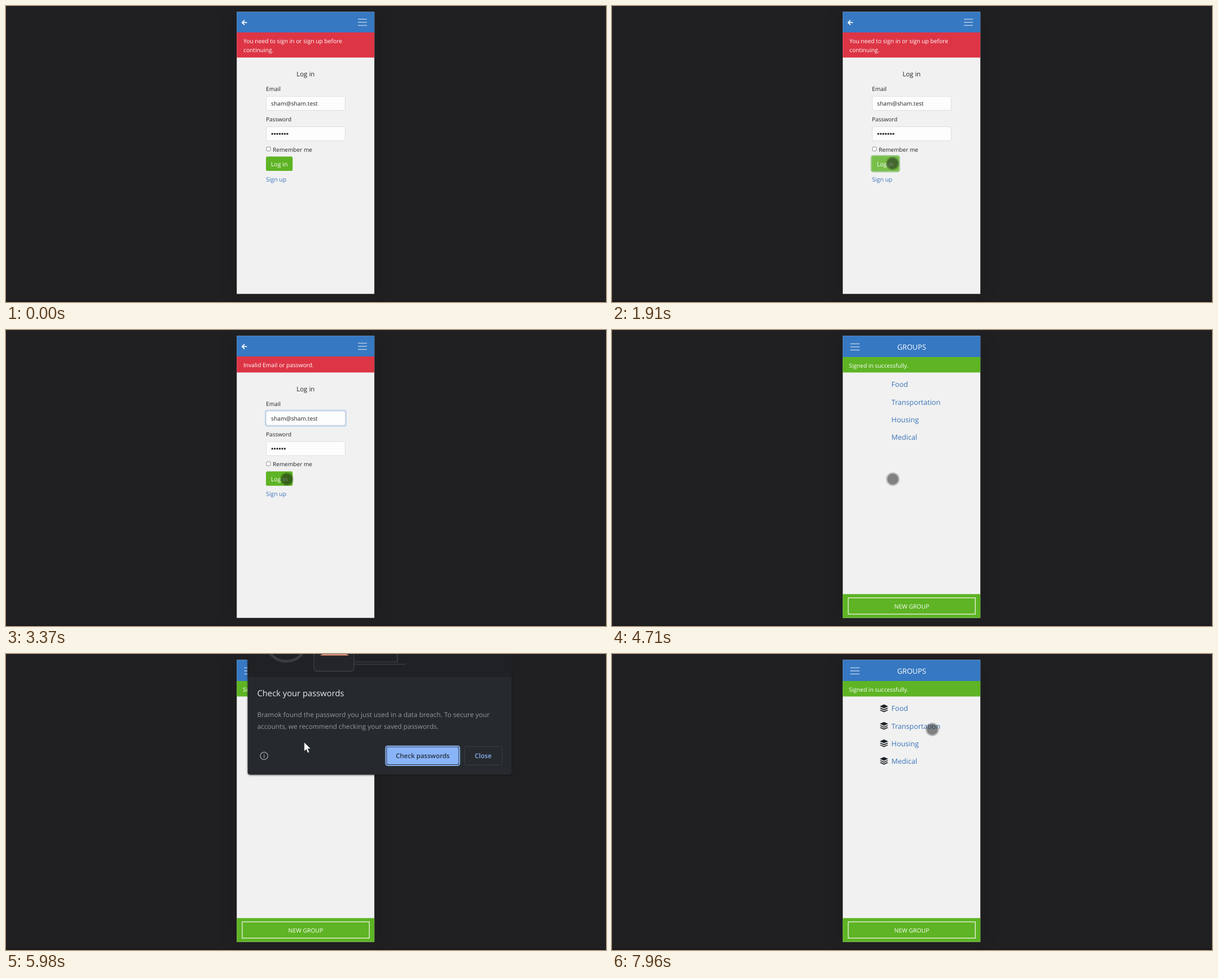
Recreate the animation shown at these times as an HTML page. Size 1064 by 526 pixels, loop 8000 ms.

```html
<!DOCTYPE html>
<html lang="en">
<head>
<meta charset="utf-8">
<title>Log in</title>
<style>
  html, body { margin: 0; width: 100%; height: 100%; overflow: hidden; background: #202022; }
  svg { display: block; width: 1064px; height: 526px; }
  text { font-family: "Open Sans", "Noto Sans", sans-serif; font-size: 10.25px; fill: #212529; white-space: pre; text-rendering: geometricPrecision; }
  .white { fill: #fff; }
  .link { fill: #3873b9; }
  .mid { text-anchor: middle; }
  .item { font-size: 12.6px; }
  .field { fill: #fdfdfd; stroke: #dcdee0; }
  .bars { stroke: #fff; stroke-opacity: .62; stroke-width: 1.3; }
  .para { font-size: 11.85px; fill: #94989d; }
  .bold { font-size: 11.5px; font-weight: 600; }
  .art { fill: none; stroke: #3a3b3e; }
</style>
</head>
<body>
<svg viewBox="0 0 1064 526">
  <defs>
    <filter id="soft" x="-20%" y="-20%" width="140%" height="140%"><feGaussianBlur stdDeviation="11"/></filter>
    <filter id="drop" x="-5%" y="-10%" width="110%" height="125%">
      <feDropShadow dx="0" dy="1" stdDeviation="1.6" flood-color="#000" flood-opacity=".5"/>
    </filter>
    <clipPath id="phone"><rect x="409.2" y="10.4" width="244" height="501.2"/></clipPath>
  </defs>

  <rect width="1064" height="526" fill="#202022"/>
  <rect y="524" width="1064" height="2" fill="#1a1a1c"/>
  <rect x="394" y="12" width="274" height="500" fill="#000" opacity=".06" filter="url(#soft)"/>
  <rect x="409.2" y="10.4" width="244" height="501.2" fill="#f1f1f1"/>

  <g id="login">
    <rect x="409.2" y="10.4" width="244" height="37" fill="#3678c2"/>
    <path id="back" d="M427.3 29.4H419M422.9 25.2L418.7 29.4L422.9 33.6" fill="none" stroke="#fff" stroke-width="1.7"/>
    <path class="bars" d="M624 23.5h16M624 29h16M624 34.5h16"/>
    <rect id="flash" x="409.2" y="47" width="244" fill="#dd3545"/>
    <g id="ask">
      <text class="white" x="421" y="66">You need to sign in or sign up before</text>
      <text class="white" x="421" y="82">continuing.</text>
    </g>
    <text class="white" id="bad" x="421" y="66">Invalid Email or password.</text>
    <g id="form">
      <text class="mid" x="531.3" y="125" style="font-size:11.5px;font-weight:500">Log in</text>
      <text x="461" y="151.3">Email</text>
      <rect id="mailRing" x="459" y="158" width="145" height="30" rx="4.5" fill="#bdd3ec"/>
      <rect class="field" x="461.5" y="160.5" width="140" height="25" rx="2.5"/>
      <text x="470" y="177">sham@sham.test</text>
      <text x="461" y="205" style="font-size:10.05px">Password</text>
      <rect class="field" x="461.5" y="214.5" width="140" height="25" rx="2.5"/>
      <g id="dots" fill="#212529"></g>
      <rect x="461.9" y="250.5" width="7" height="7" rx="1" fill="#fff" stroke="#767676" stroke-width=".8"/>
      <text x="473" y="258.8" style="font-size:10.1px">Remember me</text>
      <rect id="goRing" x="458.7" y="265" width="52" height="30.4" rx="4.5" fill="#9cc987"/>
      <rect x="461" y="267.5" width="47.3" height="25.6" rx="2.5" fill="#5eb424"/>
      <rect id="goLight" x="461" y="267.5" width="47.3" height="25.6" rx="2.5" fill="#78bf49"/>
      <text class="white" x="469.8" y="285.3" style="font-size:10.6px">Log in</text>
      <text class="link" x="461" y="311.8" style="font-size:10.5px">Sign up</text>
    </g>
  </g>

  <g id="groups">
    <rect x="409.2" y="10.4" width="244" height="38" fill="#3678c2"/>
    <path class="bars" d="M422.5 24.5h16.5M422.5 30h16.5M422.5 35.5h16.5"/>
    <text class="white mid" x="531.3" y="34.7" style="font-size:12.8px">GROUPS</text>
    <rect x="409.2" y="48" width="244" height="27.5" fill="#5eb424"/>
    <text class="white" x="420" y="66.6">Signed in successfully.</text>
    <g id="names"></g>
    <g id="icons" fill="#212529"></g>
    <rect x="409.2" y="469.3" width="244" height="42.3" fill="#5eb424"/>
    <rect x="418.9" y="476" width="225.4" height="28.8" fill="none" stroke="#e4f1da" stroke-width="1.4"/>
    <text class="white mid" x="531.5" y="494.8" style="font-size:10.4px">NEW GROUP</text>
  </g>

  <g id="dialog">
    <path d="M428.5 -40H896.3V210Q896.3 214.4 892 214.4H433Q428.5 214.4 428.5 210Z" fill="#282a2d" filter="url(#drop)"/>
    <rect x="428.5" y="-40" width="467.8" height="81" fill="#202124"/>
    <circle class="art" cx="497" cy="-23" r="36" stroke-width="5"/>
    <path class="art" d="M617 14H694V-20M617 18.2H708" stroke-width="1.6"/>
    <rect x="546" y="-40" width="71" height="70.5" rx="5" fill="#242528" stroke="#3f4043" stroke-width="1.3"/>
    <path d="M561 0H604L608 2.8H557Z" fill="#d98f78"/>
    <text x="445.5" y="74.8" style="font-size:14.75px;fill:#e8eaed">Check your passwords</text>
    <text class="para" x="445.5" y="111.6">Bramok found the password you just used in a data breach. To secure your</text>
    <text class="para" x="445.5" y="132.8">accounts, we recommend checking your saved passwords.</text>
    <circle cx="457.7" cy="181" r="6.7" fill="none" stroke="#9aa0a6" stroke-width="1.3"/>
    <path d="M457.7 180V184.4M457.7 177.3V178.7" stroke="#9aa0a6" stroke-width="1.4"/>
    <rect id="focus" x="673.5" y="163.7" width="130.8" height="34.2" rx="3.5" fill="#282a2d" stroke="#8ab4f8" stroke-width="2"/>
    <rect x="675.4" y="165.6" width="127" height="30.4" rx="2.5" fill="#8ab4f8"/>
    <rect id="plain" x="673.9" y="164.2" width="130" height="33.7" rx="3.5" fill="#8ab4f8"/>
    <text class="bold mid" x="739" y="185" style="fill:#27303f">Check passwords</text>
    <rect x="813" y="164.4" width="67" height="33" rx="3.5" fill="none" stroke="#3c4043"/>
    <text class="bold mid" x="846.2" y="185" style="fill:#8ab4f8">Close</text>
  </g>

  <g clip-path="url(#phone)">
    <g id="touch">
      <circle r="12" fill="#101010" opacity=".24"/>
      <circle r="9.7" fill="#101010" opacity=".34"/>
    </g>
  </g>
  <path id="arrow" d="M0 0V16.2L3.7 12.8L6.4 19L9.2 17.8L6.5 11.8H11.8Z" fill="#fff" stroke="#111" stroke-width=".6"/>
</svg>
<script>
const LOOP = 8000;
const TAP1 = 1430, RELOAD = 2590, BACK_ICON = 2930, TAP2 = 3560, HOME = 4710, ICONS = 4840;
const OPEN = 5770, DISMISS = 7080, GONE = 7290;

// time, x, y
const pointer = [
  [430, 657, 350], [499, 657, 350], [500, 596, 325], [650, 596, 325], [900, 562, 264],
  [1130, 526, 231], [1430, 496, 281], [1880, 496, 281], [2240, 514, 266], [2660, 538, 242],
  [2890, 538, 242], [3140, 514, 256], [3370, 498, 265], [5320, 498, 265], [5510, 526, 194],
  [5730, 526, 194], [5980, 528.5, 156.8], [6450, 640, 168], [6600, 640, 168], [6960, 845.5, 176],
  [7440, 845.5, 176], [7700, 714, 155], [7960, 568, 134]
];
// time, opacity, rise, scale
const panel = [
  [OPEN, .35, -9, 1.012], [5840, .85, -3, 1.006], [5910, 1, 0, 1],
  [DISMISS, 1, 0, 1], [7150, .98, -3.3, 1.0075], [7220, .5, -6, 1.012], [GONE, 0, -9, 1.015]
];

const $ = id => document.getElementById(id);
const show = (id, on) => $(id).setAttribute("visibility", on ? "visible" : "hidden");
const fade = (id, a) => $(id).setAttribute("opacity", a);
const move = (id, x, y) => $(id).setAttribute("transform", `translate(${x} ${y})`);
const ramp = (t, start, span = 140) => Math.min(1, Math.max(0, (t - start + 20) / span));

function sample(rows, t) {
  const i = rows.findIndex(r => r[0] > t);
  if (i < 0) return rows[rows.length - 1].slice(1);
  if (i === 0) return rows[0].slice(1);
  const a = rows[i - 1], b = rows[i], k = (t - a[0]) / (b[0] - a[0]);
  return a.slice(1).map((v, n) => v + (b[n + 1] - v) * k);
}

["Food", "Transportation", "Housing", "Medical"].forEach((name, i) => {
  const y = 31.1 * i;
  const flap = top => `M474.8 ${top}l1.9-.9 5.6 2.5 5.6-2.5 1.9.9-7.5 3.5z`;
  $("names").innerHTML += `<text class="link item" x="495.6" y="${101.4 + y}">${name}</text>`;
  $("icons").innerHTML += `<path transform="translate(0 ${y})" d="M482.3 89.6l7.5 3.4-7.5 3.4-7.5-3.4z${flap(96.5)}${flap(99.9)}"/>`;
});
for (let i = 0; i < 7; i++) {
  $("dots").innerHTML += `<circle cx="${472.2 + 4.45 * i}" cy="227.2" r="1.65"/>`;
}
const lastDot = $("dots").lastElementChild;

function draw(t) {
  const home = t >= HOME, retry = t >= RELOAD && !home;
  $("login").style.display = home ? "none" : "";
  $("groups").style.display = home ? "" : "none";
  show("back", t < RELOAD || t >= BACK_ICON);
  show("ask", !retry);
  show("bad", retry);
  $("flash").setAttribute("height", retry ? 28.5 : 44.6);
  move("form", 0, retry ? -16.3 : 0);
  lastDot.style.display = retry ? "none" : "";
  fade("mailRing", retry ? ramp(t, RELOAD) * (1 - ramp(t, TAP2)) : 0);
  const pressed = ramp(t, retry ? TAP2 : TAP1);
  fade("goRing", pressed);
  fade("goLight", pressed);
  show("icons", t >= ICONS);

  const open = t >= OPEN && t < GONE;
  $("dialog").style.display = open ? "" : "none";
  if (open) {
    const [alpha, rise, scale] = sample(panel, t);
    fade("dialog", alpha);
    $("dialog").setAttribute("transform", `translate(662 ${100 + rise}) scale(${scale}) translate(-662 -100)`);
    show("focus", t < DISMISS);
    show("plain", t >= DISMISS);
  }

  const [x, y] = sample(pointer, t);
  const asArrow = open || x > 653;
  show("arrow", t >= 430 && asArrow);
  show("touch", t >= 430 && !asArrow);
  move("arrow", x, y);
  move("touch", x, y);
}

const start = performance.now();
function tick() {
  draw((performance.now() - start) % LOOP);
  requestAnimationFrame(tick);
}
draw(0);
requestAnimationFrame(tick);
</script>
</body>
</html>
```
